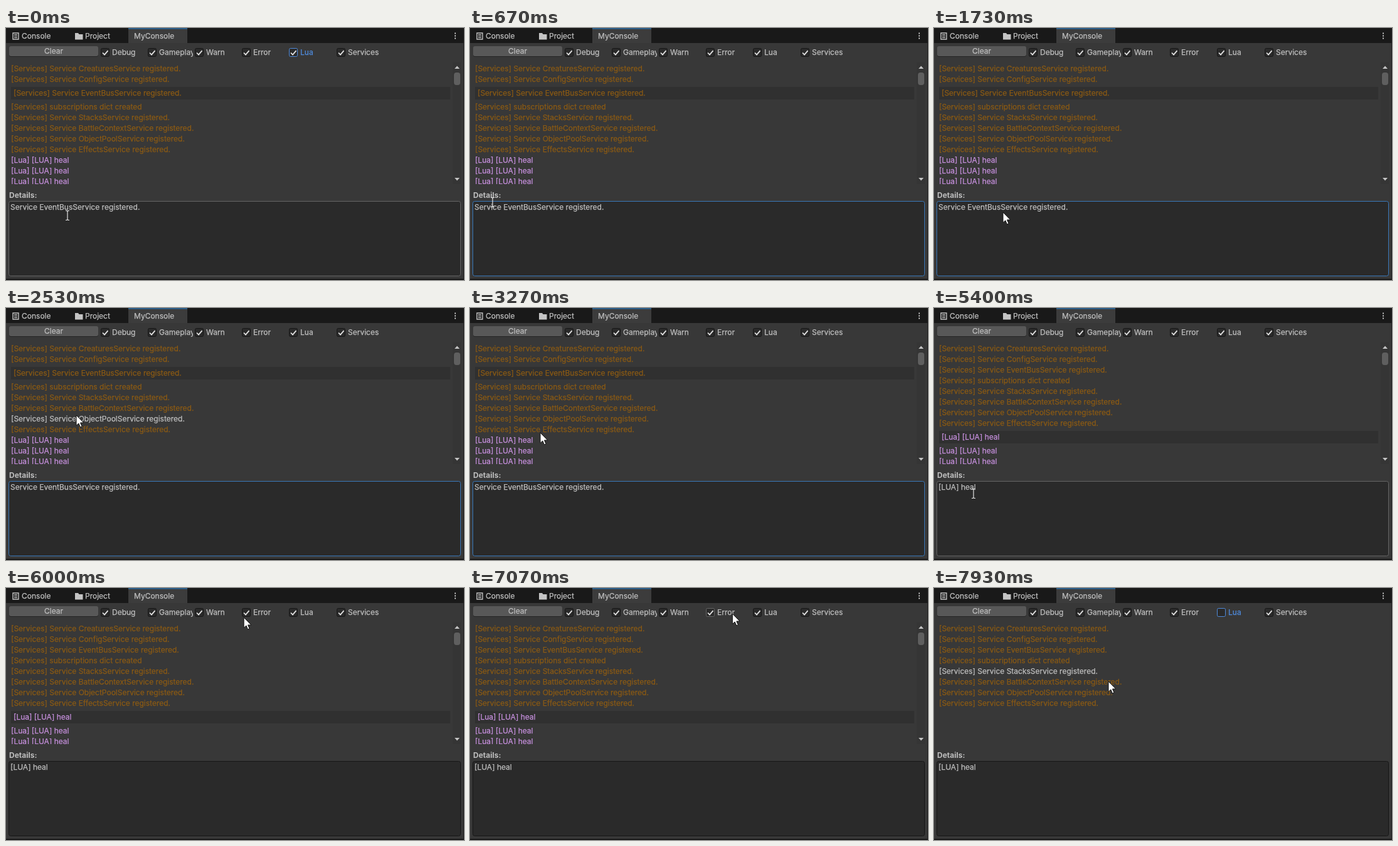
An HTML page for the animation above (8000 ms loop, 730x402 px).

```html
<!DOCTYPE html>
<html lang="en">
<head>
<meta charset="utf-8">
<title>Console window</title>
<style>
  html, body { margin: 0; width: 100%; height: 100%; overflow: hidden; background: #383838; }
  svg { display: block; width: 730px; height: 402px; }
  text {
    font: 12px Inter, "Liberation Sans", sans-serif; white-space: pre;
    color: #bebebe; fill: currentColor; stroke: currentColor; stroke-width: .25px;
  }
  .bold { font-weight: 700; stroke: none; }
</style>
</head>
<body>
<svg viewBox="0 0 730 402" xmlns="http://www.w3.org/2000/svg">
  <defs>
    <clipPath id="listClip"><rect x="4" y="54" width="706" height="195"/></clipPath>
    <clipPath id="toggleClip"><rect x="226" y="28" width="72" height="24"/></clipPath>
  </defs>

  <rect width="730" height="402" fill="#383838"/>
  <rect width="730" height="24" fill="#191919"/>
  <rect x="195" width="94" height="24" fill="#3c3c3c"/>
  <rect x="195" width="94" height="2" fill="#2c5d87"/>
  <rect y="400" width="730" height="2" fill="#191919"/>
  <rect x="729" width="1" height="402" fill="#191919"/>

  <g fill="#c4c4c4">
    <path d="M11 8h9v10h-9z" fill="none" stroke="#c4c4c4" stroke-width="1.4"/>
    <path d="M13 10h5v1.2h-5zM13 12.4h5v1.2h-5zM13 14.8h5v1.2h-5z"/>
    <path d="M110 8h5l1.5 2h6v8.5h-12.5z"/>
    <path d="M715 7.500h2v2h-2zM715 11.500h2v2h-2zM715 15.500h2v2h-2z"/>
  </g>
  <text x="25" y="17">Console</text>
  <text x="126" y="17">Project</text>
  <text x="204" y="17">MyConsole</text>

  <rect x="5" y="30" width="142" height="16" rx="3" fill="#242424"/>
  <rect x="5" y="29" width="142" height="16" rx="3" fill="#585858"/>
  <text x="76" y="41" text-anchor="middle">Clear</text>

  <g id="toggles"></g>
  <g id="list" clip-path="url(#listClip)">
    <rect id="selection" x="8" width="700" height="20" fill="#303030"/>
  </g>

  <g id="scrollbar">
    <rect x="712" y="55" width="13" height="194" fill="#353535"/>
    <path d="M715 65l4 -4.5 4 4.5zM715 239l4 4.5 4 -4.5z" fill="#c4c4c4"/>
    <rect x="714" y="71" width="10" height="20" rx="4" fill="#5f5f5f"/>
  </g>

  <text class="bold" x="5" y="271">Details:</text>
  <rect id="details" x="4.5" y="276.5" width="720" height="119" rx="3" fill="#2a2a2a"/>
  <text id="message" x="7" y="290"></text>

  <path id="arrow" d="M0 0V16.5L3.800 13L6.400 19L9 17.900L6.500 12H11.700Z" fill="#fff" stroke="#111"/>
  <path id="beam" d="M-3 -7.500H-1L0 -6.500L1 -7.500H3M0 -6.500V6.500M-3 7.500H-1L0 6.500L1 7.500H3" fill="none" stroke="#e4e4e4" stroke-width="1.2"/>
</svg>

<script>
const LOOP = 8000, ROW = 17, LIST_TOP = 56, HOVER_LAG = 80;
const TEXT = '#bebebe', BROWN = '#8a5a14', PURPLE = '#c58fdc';
const BLUE = '#3a79bb', ACCENT = '#4f8bdc', EDGE = '#656565', DARK = '#161616';

const $ = id => document.getElementById(id);
const show = (node, visible) => set(node, { visibility: visible ? 'visible' : 'hidden' });

function set(node, attrs) {
  for (const key in attrs) node.setAttribute(key, attrs[key]);
}
function add(parent, tag, attrs, content = '') {
  const node = document.createElementNS('http://www.w3.org/2000/svg', tag);
  set(node, attrs);
  node.textContent = content;
  return parent.appendChild(node);
}

const registered = name => `Service ${name}Service registered.`;
const rows = [
  ...['Creatures', 'Config', 'EventBus'].map(registered),
  'subscriptions dict created',
  ...['Stacks', 'BattleContext', 'ObjectPool', 'Effects'].map(registered),
  ...Array(3).fill('[LUA] heal')
].map(message => {
  const lua = message.startsWith('[LUA]');
  const node = add($('list'), 'text', {}, `[${lua ? 'Lua' : 'Services'}] ${message}`);
  return { message, lua, node };
});

const toggles = ['Debug', 'Gameplay', 'Warn', 'Error', 'Lua', 'Services'].map((name, i) => {
  const left = Math.floor(151 + i * 75.2);
  const group = add($('toggles'), 'g', name === 'Gameplay' ? { 'clip-path': 'url(#toggleClip)' } : {});
  const box = add(group, 'rect', { x: left + .5, y: 32.5, width: 13, height: 13, rx: 2, fill: '#2a2a2a' });
  const check = add(group, 'path', {
    d: `M${left + 3} 39.5l3 3.2 5.5 -6.5`, fill: 'none', stroke: '#e0e0e0', 'stroke-width': 1.8
  });
  const label = add(group, 'text', { x: left + 18, y: 43 }, name);
  return { name, left, box, check, label };
});

// Clicks, in ms
const FOCUS_TEXT = 270, PICK_POOL = 3730, PICK_LUA = 4870, HIDE_LUA = 7670;

// Each pointer move eases out: start, end, target x, target y
const START = [98, 299];
const moves = [
  [70, 670, 36, 278],
  [930, 1130, 117, 294],
  [1470, 1730, 110, 294],
  [1870, 2530, 112, 171],
  [2670, 2930, 112, 257],
  [3070, 3530, 112, 172],
  [PICK_POOL, 4200, 90, 223],
  [4270, 4600, 82, 215],
  [PICK_LUA, 5400, 63, 296],
  [5730, 5930, 379, 47],
  [6000, 6670, 418, 41],
  [7070, 7330, 459, 40],
  [HIDE_LUA, 7930, 278, 149]
];

function pointerAt(t) {
  let [x, y] = START;
  for (const [from, to, endX, endY] of moves) {
    const rest = 1 - Math.min(1, Math.max(0, (t - from) / (to - from)));
    const eased = 1 - rest * rest;
    x += (endX - x) * eased;
    y += (endY - y) * eased;
  }
  return [x, y];
}

function drawList(t, selected, filtered) {
  const hoverY = pointerAt(t - HOVER_LAG)[1];
  let top = LIST_TOP;
  rows.forEach(({ lua, node }, i) => {
    const chosen = i === selected, visible = !(filtered && lua);
    const height = chosen ? ROW + 10 : ROW;
    const hovered = !lua && !chosen && hoverY >= top && hoverY < top + height;
    set(node, { x: chosen ? 12 : 8, y: top + height / 2 + 4.5 });
    node.style.color = hovered ? TEXT : lua ? PURPLE : BROWN;
    show(node, visible);
    if (chosen) {
      set($('selection'), { y: top + 4 });
      show($('selection'), visible);
    }
    top += height;
  });
  show($('scrollbar'), !filtered);
}

function drawToggles(x, y, luaFocus, filtered) {
  for (const { name, left, box, check, label } of toggles) {
    const focused = name === 'Lua' && luaFocus;
    const over = x >= left && x < left + 72 && y > 30 && y < 46;
    set(box, { stroke: focused ? ACCENT : over ? EDGE : DARK });
    label.style.color = focused ? ACCENT : TEXT;
    show(check, !(name === 'Lua' && filtered));
  }
}

function render(t) {
  const [x, y] = pointerAt(t);
  const selected = t < PICK_POOL ? 2 : t < PICK_LUA ? 6 : 8;
  const filtered = t >= HIDE_LUA;
  const textFocus = t >= FOCUS_TEXT && t < PICK_POOL;
  const overText = x > 4 && x < 725 && y > 276 && y < 396;
  const beam = overText && !(t > 1600 && t < PICK_POOL);

  drawList(t, selected, filtered);
  drawToggles(x, y, t < FOCUS_TEXT || filtered, filtered);
  set($('details'), { stroke: textFocus ? BLUE : overText ? EDGE : DARK });
  $('message').textContent = rows[selected].message;

  show($('beam'), beam);
  show($('arrow'), !beam);
  set($(beam ? 'beam' : 'arrow'), { transform: `translate(${x} ${y})` });
}

function tick(now) {
  render(now % LOOP);
  requestAnimationFrame(tick);
}
render(0);
requestAnimationFrame(tick);
</script>
</body>
</html>
```
